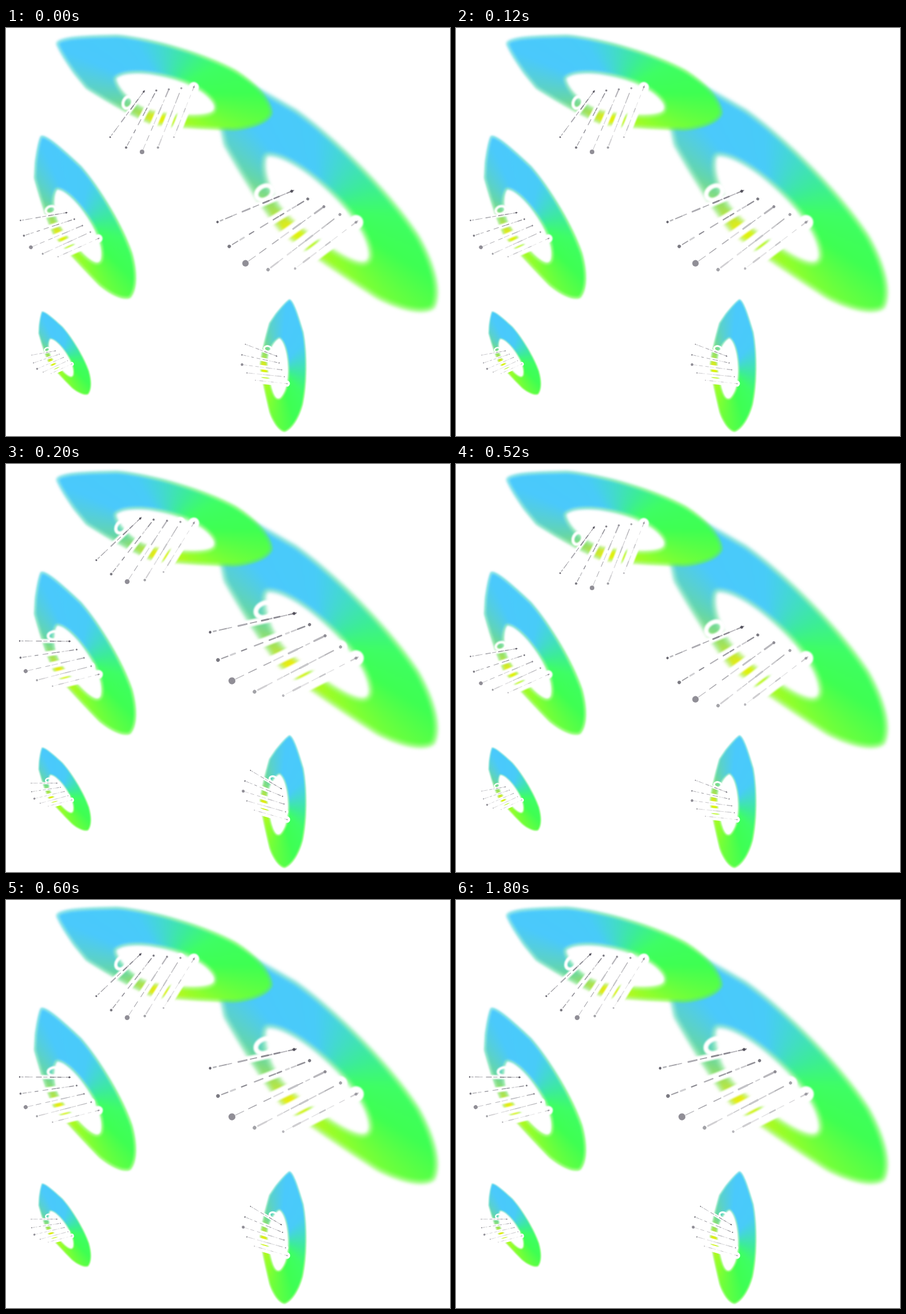
Write an HTML page with a canvas that moves like this. It is 780 px wide and 718 px high and loops after 2600 ms.

```html
<!DOCTYPE html>
<html lang="en">
<head>
<meta charset="utf-8">
<title>Drifting rings</title>
<style>
  html, body { margin: 0; width: 100%; height: 100%; overflow: hidden; background: #fff; }
  canvas { display: block; }
</style>
</head>
<body>
<canvas id="stage" width="780" height="718"></canvas>
<script>
const W = 780, H = 718, LOOP = 2600, STEP = 200, TAU = Math.PI * 2;
const stage = document.getElementById('stage').getContext('2d');
const rad = deg => deg * Math.PI / 180;

// One fish, drawn at unit size with its tip at TIP and its fin hinged at ROOT
const TIP = [90, 25], ROOT = [331, 104];
const OUTLINE = 'M90 27C97 16 150 15 195 14C260 20 350 47 403 76C438 98 464 126 466 150' +
  'C460 166 430 176 400 178C350 176 290 173 255 167C215 150 172 124 142 105L120 78C110 63 97 45 90 27Z';
const HOLE = 'M191 88C203 75 240 76 265 81C311 89 352 107 367 133C375 152 352 156 320 155' +
  'C290 154 256 150 236 140C213 127 193 105 191 88Z';
const ring = new Path2D(OUTLINE + HOLE);

// Angle around the ring in degrees, colour
const HUES = [
  [0, '#3eff52'], [38, '#8cff2d'], [108, '#f0ee05'], [151, '#96e064'],
  [174, '#64d6aa'], [203, '#4ac9fc'], [240, '#48cbf8'], [300, '#3ceb9b'], [332, '#3efe64'], [360, '#3eff52']
];
const RIM = ['#3cdebe', '#50e66e', '#69fa28'];

// Back to front; x and y place the tip
const school = [
  { x: 374, y: 81, turn: 31, len: 1.42, wid: 1.26 },
  { x: 90, y: 25, turn: 0, len: 1, wid: 1 },
  { x: 63, y: 190, turn: 44, len: .82, wid: .77 },
  { x: 64, y: 499, turn: 43.5, len: .42, wid: .4 },
  { x: 499, y: 478, turn: 74.4, len: .587, wid: .57 }
];

const POSES = [{ sway: 0, reach: 1 }, { sway: 10, reach: 1.07 }];

// Five strands fan out from the hole; their feet lie on an arch
const strands = Array.from({ length: 5 }, (_, i) => {
  const arch = Math.sin(i * Math.PI / 4);
  return {
    foot: [183 + 28 * i, 192 + 26 * arch],
    head: [242 + 22 * i, 112 - 2 * i],
    width: 8 + 2.5 * i,
    knob: 1.5 + 2.5 * arch ** 4,
    ink: .75 - .1 * i
  };
});

function seeded(seed) {
  return () => (seed = (seed * 16807) % 2147483647) / 2147483647;
}

const mix = (p, q, t) => [p[0] + (q[0] - p[0]) * t, p[1] + (q[1] - p[1]) * t];

function line(g, p, q) {
  g.beginPath();
  g.moveTo(...p);
  g.lineTo(...q);
  g.stroke();
}

function dot(g, [x, y], r) {
  g.beginPath();
  g.arc(x, y, r, 0, TAU);
  g.fill();
}

function place(g, { x, y, turn, len, wid }) {
  g.translate(x, y);
  g.rotate(rad(turn));
  g.scale(len, wid);
  g.translate(-TIP[0], -TIP[1]);
}

function drawBody(g, fish) {
  const blur = 3 * fish.len;
  const fill = g.createConicGradient(0, 280, 115);
  HUES.forEach(([deg, colour]) => fill.addColorStop(deg / 360, colour));
  const rim = g.createLinearGradient(90, 0, 350, 0);
  RIM.forEach((colour, i) => rim.addColorStop(i / 2, colour));

  g.save();
  place(g, fish);
  g.filter = `blur(${blur}px)`;
  g.fillStyle = fill;
  g.fill(ring, 'evenodd');
  g.filter = `blur(${blur * .7}px)`;
  g.globalAlpha = .45;
  g.strokeStyle = rim;
  g.lineWidth = 3;
  g.stroke(ring);
  g.restore();
}

// Broken, uneven pen line from foot to head
function drawInk(g, { foot, head, knob, ink }, rnd) {
  for (let t = .04; t < .95;) {
    const dash = .03 + .07 * rnd();
    g.globalAlpha = ink * (.25 + .65 * rnd());
    g.lineWidth = .8 + 1.5 * rnd();
    line(g, mix(foot, head, t), mix(foot, head, t + dash));
    t += dash + .01 + .09 * rnd() ** 2;
  }
  g.globalAlpha = ink;
  dot(g, foot, knob);
  dot(g, head, 1.8);
}

function drawFin(g, fish, { sway, reach }) {
  const rnd = seeded(71);
  g.save();
  place(g, fish);
  g.translate(...ROOT);
  g.scale(reach, reach * fish.len / fish.wid);
  g.rotate(rad(sway));
  g.translate(-ROOT[0], -ROOT[1]);
  g.lineCap = 'round';

  g.filter = `blur(${fish.len}px)`;
  g.strokeStyle = '#fff';
  for (const s of strands) {
    g.lineWidth = s.width;
    line(g, s.foot, s.head);
  }
  g.lineWidth = 5.5;
  g.beginPath();
  g.ellipse(214, 131, 8, 11, .45, 0, TAU);
  g.stroke();

  g.filter = `blur(${fish.len * .45}px)`;
  g.strokeStyle = g.fillStyle = '#34323f';
  strands.forEach(s => drawInk(g, s, rnd));
  g.restore();
}

function paint(pose) {
  const sheet = document.createElement('canvas');
  sheet.width = W;
  sheet.height = H;
  const g = sheet.getContext('2d');
  g.fillStyle = '#fff';
  g.fillRect(0, 0, W, H);
  for (const fish of school) {
    drawBody(g, fish);
    drawFin(g, fish, pose);
  }
  return sheet;
}

const sheets = POSES.map(paint);
const start = performance.now();

// Two quick flaps, then a long rest on the raised pose
function tick() {
  const t = (performance.now() - start) % LOOP;
  const beat = Math.min(3, Math.floor(t / STEP));
  stage.drawImage(sheets[beat % 2], 0, 0);
  requestAnimationFrame(tick);
}
tick();
</script>
</body>
</html>
```
